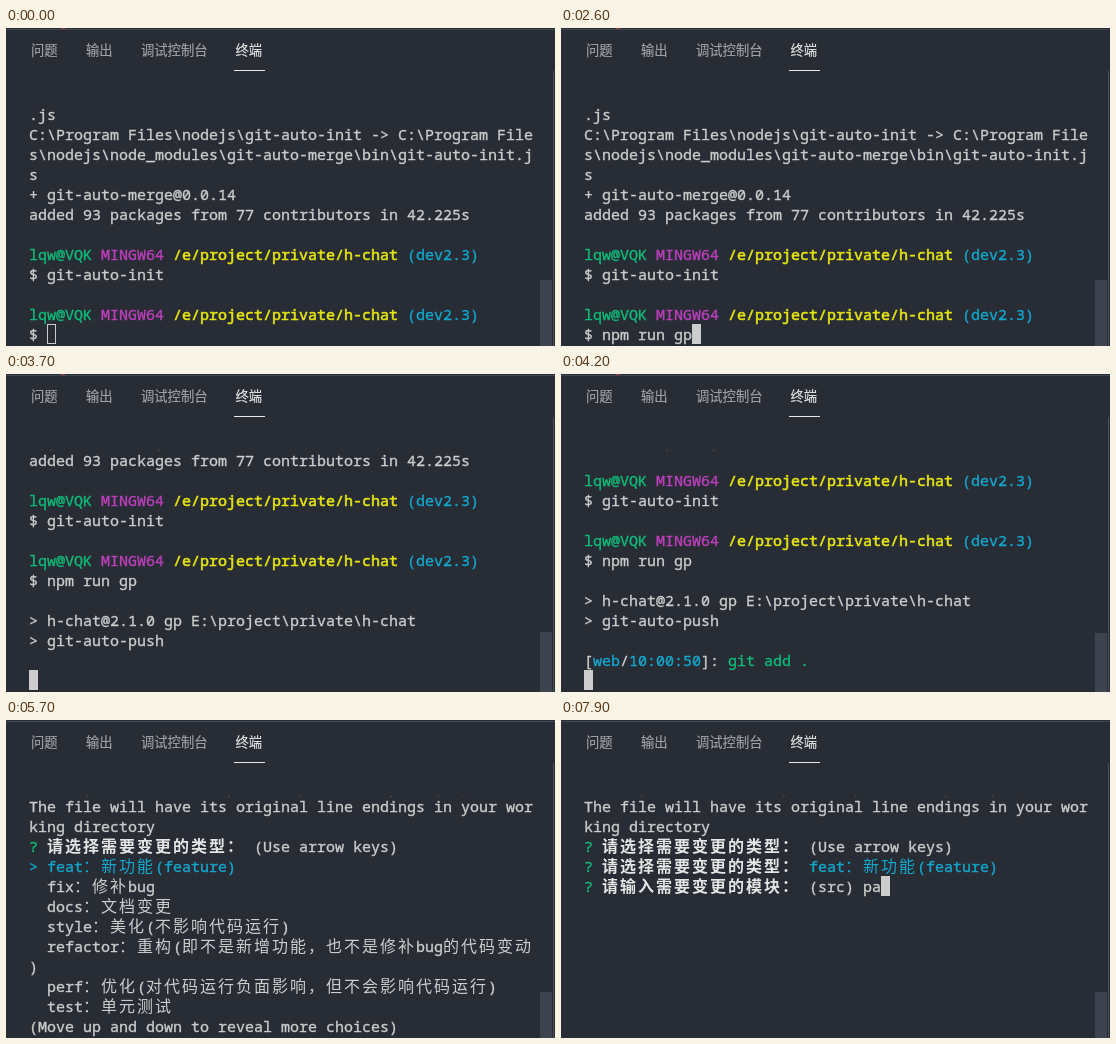
Recreate the animation shown at these times as an HTML page. Size 549 px wide and 318 px high, loop 8 s.

```html
<!DOCTYPE html>
<html lang="zh-CN">
<head>
<meta charset="utf-8">
<title>Terminal</title>
<style>
  html, body { margin: 0; width: 100%; height: 100%; overflow: hidden; background: #282c34; }
  svg { display: block; }
  text { white-space: pre; color: #ccc; fill: currentColor; stroke: currentColor; stroke-width: 0; }
  .tab { font: 13.3px "Noto Sans CJK SC", "Noto Sans CJK", sans-serif; color: #a0a4aa; stroke-width: .15px; }
  .on { color: #e7e7e7; }
  .mono { font: 15px "Noto Sans Mono", "DejaVu Sans Mono", monospace; stroke-width: .35px; }
  .wide { font: 300 16px "Noto Sans CJK SC", "Noto Sans CJK", sans-serif; letter-spacing: 2px; }
  .g { color: #0dbc79; }
  .m { color: #bc3fbc; }
  .y { color: #e5e510; stroke-width: .6px; }
  .c { color: #11a8cd; }
  .b { color: #e5e5e5; font-weight: 700; }
</style>
</head>
<body>
<svg width="549" height="318" viewBox="0 0 549 318">
  <clipPath id="view"><rect y="76" width="549" height="242"/></clipPath>
  <rect width="549" height="318" fill="#282c34"/>
  <rect y="1" width="549" height="1" fill="#414855"/>
  <rect id="spot" x="55" width="4" height="1" fill="#a8323a"/>
  <rect x="547" y="43" width="1" height="275" fill="#4b505b"/>
  <text class="tab" x="25" y="27">问题</text>
  <text class="tab" x="80" y="27">输出</text>
  <text class="tab" x="135" y="27">调试控制台</text>
  <text class="tab on" x="229.5" y="27">终端</text>
  <rect x="228" y="42" width="31" height="1" fill="#e7e7e7"/>
  <rect id="bar" x="534" width="12" height="70" fill="#3e4350"/>
  <g clip-path="url(#view)"><g id="log"><rect id="cursor" width="9" height="20"/></g></g>
</svg>
<script>
const LOOP = 8000, LEFT = 23, TOP = 76, CELL = 9, ROW = 20, BASE = 16;
const $ = id => document.getElementById(id);
const log = $('log'), cursor = $('cursor'), bar = $('bar'), spot = $('spot');

function el(name, attrs, parent) {
  const node = document.createElementNS('http://www.w3.org/2000/svg', name);
  for (const key in attrs) node.setAttribute(key, attrs[key]);
  return parent.appendChild(node);
}

// Places text on the cell grid; full-width characters take two cells.
function put(parent, row, col, str, cls = '') {
  for (const part of str.match(/[\x00-\xff]+|[^\x00-\xff]+/g) || []) {
    const wide = part.charCodeAt(0) > 255;
    el('text', {
      x: LEFT + col * CELL, y: TOP + row * ROW + BASE,
      class: (wide ? 'wide ' : 'mono ') + cls
    }, parent).textContent = part;
    col += part.length * (wide ? 2 : 1);
  }
  return col;
}

// A segment is a plain string or [colour class, string].
const lines = [];
function print(from, to, first, rows) {
  rows.forEach((segs, i) => {
    const node = el('g', {}, log);
    let col = 0;
    for (const seg of [].concat(segs)) {
      const [cls, str] = Array.isArray(seg) ? seg : ['', seg];
      col = put(node, first + i, col, str, cls);
    }
    lines.push({ node, from, to });
  });
}

const prompt = [['g', 'lqw@VQK '], ['m', 'MINGW64 '], ['y', '/e/project/private/h-chat'], ['c', ' (dev2.3)']];
const ask = (question, ...rest) => [['g', '? '], ['b', question], ...rest];
const pick = '请选择需要变更的类型：';

print(0, LOOP, 0, [
  '.js',
  'C:\\Program Files\\nodejs\\git-auto-init -> C:\\Program File',
  's\\nodejs\\node_modules\\git-auto-merge\\bin\\git-auto-init.j',
  's',
  '+ git-auto-merge@0.0.14',
  'added 93 packages from 77 contributors in 42.225s',
  '',
  prompt,
  '$ git-auto-init',
  '',
  prompt,
  '$ '
]);
print(3700, LOOP, 13, [
  '> h-chat@2.1.0 gp E:\\project\\private\\h-chat',
  '> git-auto-push'
]);
print(4200, LOOP, 16, [
  ['[', ['c', 'web'], '/', ['c', '10:00:50'], ']: ', ['g', 'git add .']]
]);
print(4300, LOOP, 17, [
  'warning: LF will be replaced by CRLF in package.json.',
  'The file will have its original line endings in your wor',
  'king directory'
]);
print(4400, LOOP, 20, [ask(pick, ' (Use arrow keys)')]);
print(4400, 6100, 21, [
  [['c', '> feat：新功能(feature)']],
  '  fix：修补bug',
  '  docs：文档变更',
  '  style：美化(不影响代码运行)',
  '  refactor：重构(即不是新增功能，也不是修补bug的代码变动',
  ')',
  '  perf：优化(对代码运行负面影响，但不会影响代码运行)',
  '  test：单元测试',
  '(Move up and down to reveal more choices)'
]);
print(6100, LOOP, 21, [
  ask(pick, ['c', ' feat：新功能(feature)']),
  ask('请输入需要变更的模块：', ' (src) ')
]);

function field(row, col, str, keys) {
  put(log, row, col, str);
  return { node: log.lastChild, row, col, str, keys };
}
const command = field(11, 2, 'npm run gp', [
  [0, 0], [1600, 2], [1700, 3], [1900, 4], [2000, 5], [2100, 6], [2200, 7], [2300, 8], [2500, 9], [2600, 10]
]);
const answer = field(22, 31, 'pa', [[0, 0], [7800, 1], [7900, 2]]);

const scrolls = [[0, 0], [3000, 1], [3700, 5], [4200, 6], [4300, 9], [4400, 18]];
const cursorRows = [[0, 11], [3000, 12], [3700, 16], [4200, 17], [4300, 20], [4400, -1], [6100, 22]];

const at = (steps, t) => steps.reduce((v, [time, value]) => time <= t ? value : v, 0);
const show = (node, on) => node.setAttribute('visibility', on ? 'visible' : 'hidden');

function draw(t) {
  const scroll = at(scrolls, t), row = at(cursorRows, t);
  let col = 0;
  log.setAttribute('transform', `translate(0 ${-scroll * ROW})`);
  bar.setAttribute('y', Math.round(252 + 1.12 * scroll));
  show(spot, t < 5700);
  for (const { node, from, to } of lines) show(node, t >= from && t < to);
  for (const f of [command, answer]) {
    const count = at(f.keys, t);
    f.node.textContent = f.str.slice(0, count);
    if (f.row === row) col = f.col + count;
  }

  const hollow = t < 600, inset = hollow ? 0.5 : 0;
  const box = {
    x: LEFT + col * CELL + inset, y: TOP + row * ROW + inset,
    width: CELL - 2 * inset, height: ROW - 2 * inset,
    fill: hollow ? 'none' : '#ccc', stroke: hollow ? '#ccc' : 'none'
  };
  for (const key in box) cursor.setAttribute(key, box[key]);
  show(cursor, row >= 0);
}

function tick() {
  draw(performance.now() % LOOP);
  requestAnimationFrame(tick);
}
draw(0);
requestAnimationFrame(tick);
</script>
</body>
</html>
```
